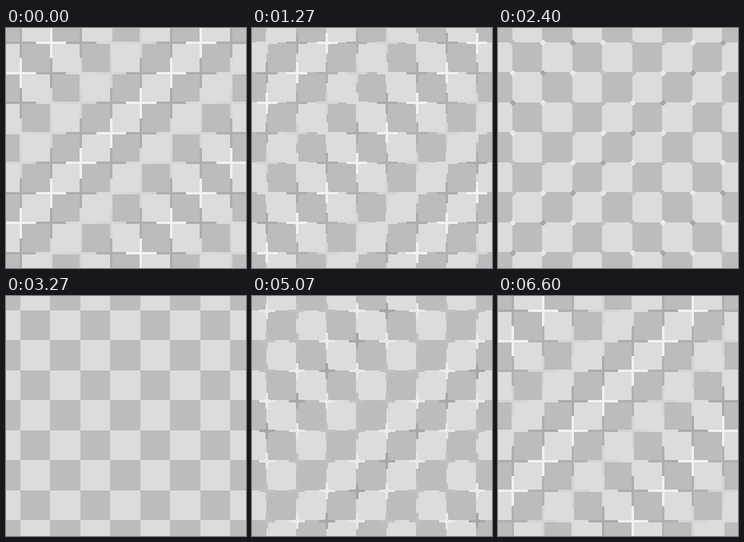
An HTML page for the animation above (6660 ms loop, 300 by 300 pixels).

```html
<!DOCTYPE html>
<html lang="en">
<head>
<meta charset="utf-8">
<title>Checkerboard crosses</title>
<style>
html, body { margin: 0; width: 100%; height: 100%; overflow: hidden; background: #dcdcdc; }
svg { display: block; width: 100%; height: 100%; }
</style>
</head>
<body>
<svg id="stage" viewBox="0 0 300 300" shape-rendering="crispEdges"></svg>
<script>
const LOOP = 6660, PITCH = 37.5, EDGE = PITCH / 2, COUNT = 8;
const TILE_EDGE = EDGE - 1; // tiles sit one pixel up and left of the crosses
const TURN = Math.PI * 2;
const stage = document.getElementById('stage');

function add(name, attrs) {
  const el = document.createElementNS('http://www.w3.org/2000/svg', name);
  for (const key in attrs) el.setAttribute(key, attrs[key]);
  stage.appendChild(el);
  return el;
}

add('rect', { width: 300, height: 300, fill: '#dcdcdc' });

for (let row = -1; row < COUNT; row++) {
  for (let col = -1; col < COUNT; col++) {
    if ((row + col) % 2 === 0) {
      add('rect', {
        x: TILE_EDGE + col * PITCH, y: TILE_EDGE + row * PITCH,
        width: PITCH, height: PITCH, fill: '#bcbcbc'
      });
    }
  }
}

// Crosses on the same diagonal share one colour, repeating every five diagonals.
const groups = [0, 1, 2, 3, 4].map(() => add('path', {}));
const spots = groups.map(() => []);
for (let row = 0; row < COUNT; row++) {
  for (let col = 0; col < COUNT; col++) {
    spots[(row + col) % 5].push([EDGE + col * PITCH, EDGE + row * PITCH]);
  }
}

const box = (x, y, w, h) => `M${x - w} ${y - h}h${2 * w}v${2 * h}h${-2 * w}z`;

function cross(x, y, arm) {
  const thin = Math.min(1.5, arm * 0.4);
  const core = Math.min(arm * 0.6, 1.5 + 1.1 * (1 - (arm / EDGE) ** 2));
  return box(x, y, arm, thin) + box(x, y, thin, arm) + box(x, y, core, core);
}

function draw(ms) {
  const p = (ms % LOOP) / LOOP;
  const arm = EDGE * (1 + Math.cos(TURN * p)) / 2;
  groups.forEach((path, k) => {
    const wave = Math.cos(TURN * (0.4 * k + 3 * p - 141 / 360));
    const grey = Math.round(204 + 37 * wave);
    path.setAttribute('fill', `rgb(${grey},${grey},${grey})`);
    path.setAttribute('d', spots[k].map(([x, y]) => cross(x, y, arm)).join(''));
  });
}

const start = performance.now();
function tick() {
  draw(performance.now() - start);
  requestAnimationFrame(tick);
}
draw(0);
requestAnimationFrame(tick);
</script>
</body>
</html>
```
